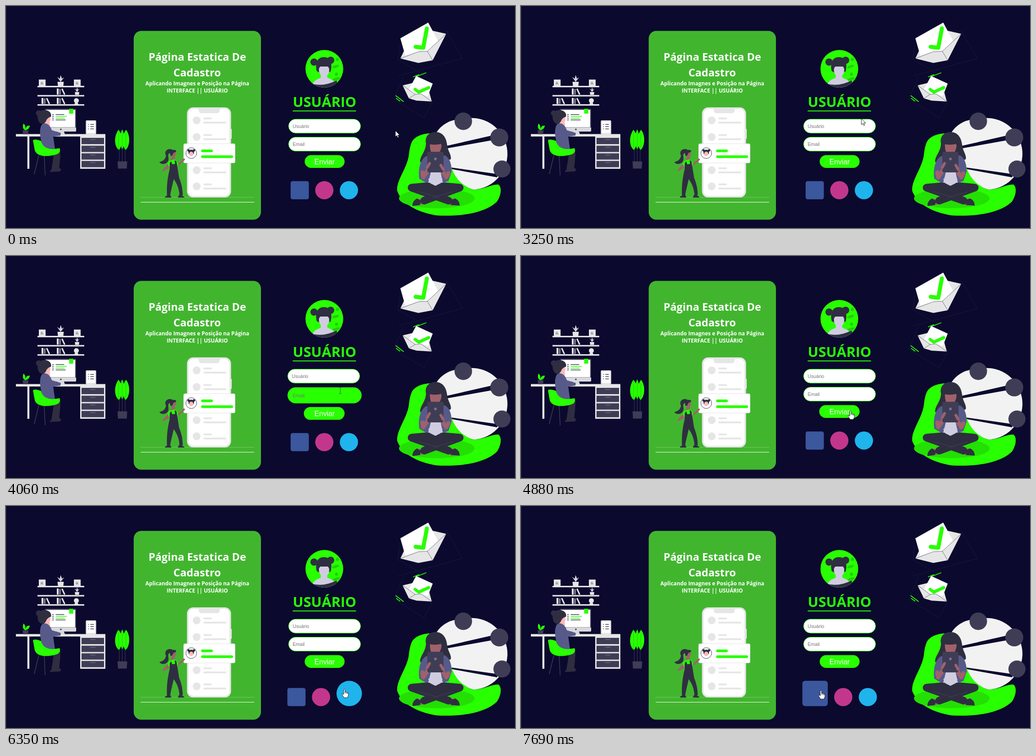
An HTML page for the animation above (8280 ms loop, 1132 by 495 pixels).

```html
<!DOCTYPE html>
<html lang="pt">
<head>
<meta charset="utf-8">
<title>Cadastro</title>
<style>
  html, body { margin: 0; width: 100%; height: 100%; overflow: hidden; background: #0b092e; }
  svg { display: block; width: 100%; height: 100%; }
  .head { font-family: "Open Sans", "Noto Sans", sans-serif; font-weight: 700; text-anchor: middle; fill: #fff; }
  .field { font: 10.67px "Liberation Sans", Arial, sans-serif; fill: #757575; }
  .line { fill: none; stroke-linecap: round; stroke-linejoin: round; }
</style>
</head>
<body>
<svg viewBox="0 0 1132 495">
  <rect width="1132" height="495" fill="#0b092e"/>
  <rect width="1" height="495" fill="#24232f"/>

  <!-- desk -->
  <g id="shelves"></g>
  <g id="desk">
    <path d="M22 285.5h199v5.5H22zM47.500 291h4.500v72h-4.500zM165 291h56v72h-56z" fill="#e6e6e6"/>
    <g id="drawers"></g>
    <rect x="86.500" y="229" width="69.500" height="51" rx="2" fill="#3f3d56"/>
    <path d="M89 231.500h65v39H89z" fill="#fff"/>
    <path d="M87 271h69v7q0 2-2 2H89q-2 0-2-2zM114 280h15l2 6h-19z" fill="#d9d9de"/>
    <circle cx="122" cy="275" r="1.800" fill="#3f3d56"/>
    <path d="M140.500 229h9v11h-9z" fill="#28ff00"/>
    <path class="line" d="M111 242h18M111 254h21" stroke="#3f3d56" stroke-width="1.400"/>
    <path class="line" d="M111 246h24M111 250h19" stroke="#28ff00" stroke-width="1.400"/>
    <path class="line" d="M104 242h1M104 246h1M104 250h1M104 254h1" stroke="#3f3d56" stroke-width="2"/>
    <rect x="177.500" y="255" width="23" height="31" rx="2" fill="#e6e6e6"/>
    <path d="M180 258h18v25h-18z" fill="#fff"/>
    <path class="line" d="M188 264h7M188 269h7M188 274h7M183 264h1M183 269h1M183 274h1" stroke="#3f3d56" stroke-width="1.300"/>
    <path d="M37 277h13l-1 9H38z" fill="#3f3d56"/>
    <path d="M43 277C36 274 37 267 39 262C43 266 44 270 43 277C44 268 48 266 53 267C52 273 48 276 43 277" fill="#28ff00"/>
    <path class="line" d="M73 333L63 374M85 334L87 377" stroke="#3f3d56" stroke-width="1.500"/>
    <path d="M94 320L117 317C122 322 121 330 120 344L118 364L101 365L106 333L92 335Z" fill="#2f2e41"/>
    <path d="M97 370Q100 361 121 362Q124 367 119 369Z" fill="#2f2e41"/>
    <path d="M88 252L97 255L98 268L84 266Z" fill="#ffb9b9"/>
    <ellipse cx="93.500" cy="252" rx="5.500" ry="7.500" fill="#ffb9b9"/>
    <path d="M80 264C89 258 98 265 102 277L122 283L121 289L105 291L109 320L86 322C76 302 72 275 80 264Z" fill="#575a89"/>
    <circle cx="73" cy="239" r="6.500" fill="#2f2e41"/>
    <path d="M72 256C67 243 73 232 85 232C96 232 102 239 100 247Q94 248 90 254C87 264 77 266 72 256Z" fill="#2f2e41"/>
    <path d="M60 300C61 296 71 298 78 301C82 318 99 322 119 317C122 323 119 329 112 331C95 336 70 338 64 322Z" fill="#28ff00"/>
    <path class="line" d="M252 300v47M258.500 300v47M265 300v47" stroke="#3f3d56"/>
    <path d="M248 346.500h21.500l-1 16H249z" fill="#3f3d56"/>
    <path d="M251 321C241 314 239 292 250 276C260 286 260 312 251 321ZM266 321C258 312 257 288 267 276C278 290 275 314 266 321ZM258.500 320C252 306 252 288 258.500 275C265 289 265 307 258.500 320Z" fill="#28ff00"/>
    <path class="line" d="M250.500 280V321M258.500 280V320M266.500 280V321" stroke="#18a806" stroke-width=".6"/>
  </g>

  <!-- card -->
  <rect x="284" y="55.500" width="283" height="421" rx="17" fill="#42b52f"/>
  <g class="head">
    <text x="425.500" y="122" font-size="23.700">Página Estatica De</text>
    <text x="425" y="156.500" font-size="23.700">Cadastro</text>
    <text x="425.500" y="177" font-size="11.850">Aplicando Imagnes e Posição na Página</text>
    <text x="425.500" y="193" font-size="11.850">INTERFACE || USUÁRIO</text>
  </g>
  <path d="M299 426.500h253" stroke="#72ca63"/>
  <path d="M299.500 437.500h252.500" stroke="#fff"/>
  <rect x="499" y="274" width="3" height="22" rx="1" fill="#e6e6e6"/>
  <rect x="402.500" y="226" width="98" height="201" rx="14" fill="#e6e6e6"/>
  <rect x="406" y="229.500" width="91" height="194" rx="11" fill="#fff"/>
  <path d="M427 229h50q-2 2-2 4q0 6-6 6h-34q-6 0-6-6q0-2-2-4z" fill="#e6e6e6"/>
  <g id="rows" fill="#e6e6e6"></g>
  <rect x="395" y="307" width="114.500" height="43" rx="3" fill="#fff" stroke="#d9dcd9" stroke-width=".8"/>
  <circle cx="412" cy="328" r="12" fill="#fff" stroke="#3f3d56"/>
  <g fill="#2f2e41"><circle cx="406" cy="322" r="2.700"/><circle cx="418" cy="322" r="2.700"/><circle cx="412" cy="326.500" r="6.300"/></g>
  <ellipse cx="412" cy="329.500" rx="4.600" ry="5.200" fill="#ffb9b9"/>
  <path d="M407 327q5-5 10 0v-3q-5-4-10 0z" fill="#2f2e41"/>
  <rect x="434" y="320" width="26" height="6" rx="3" fill="#28ff00"/>
  <rect x="434" y="333" width="71" height="6" rx="3" fill="#28ff00"/>
  <path d="M370 320C357 316 351 326 356 334C353 345 347 346 341 348C346 356 365 353 361 336C360 328 364 327 368 329Z" fill="#2f2e41"/>
  <path d="M368 332L375 330L376 344L367 345Z" fill="#9f616a"/>
  <circle cx="372.500" cy="330" r="5.700" fill="#9f616a"/>
  <path d="M366 334C362 324 369 318 378 322Q380 326 373 327L369 334Z" fill="#2f2e41"/>
  <path class="line" d="M363 352L350 366L366 357M379 349L384 353L396 342" stroke="#9f616a" stroke-width="4"/>
  <path d="M359 351L364 345L374 342L380 345L383 352L379 362L365 363Z" fill="#28ff00"/>
  <path d="M364 351L367 346L370 353L376 352L375 344L379 346L382 364L385 383C389 393 393 405 393 422L386 423C385 408 381 397 373 386C370 400 367 410 365 423L358 422C357 403 359 383 364 364Z" fill="#2f2e41"/>
  <path d="M353 427q2-5 12-6l3 6zM382 427l3-6q9 1 12 6z" fill="#2f2e41"/>

  <!-- sign-up form -->
  <clipPath id="round"><circle cx="708" cy="140" r="42"/></clipPath>
  <circle cx="708" cy="140" r="42" fill="#28ff00"/>
  <g clip-path="url(#round)">
    <g fill="#20cf05"><circle cx="737" cy="119" r="3.500"/><circle cx="735" cy="152" r="3.500"/><ellipse cx="733" cy="135" rx="8" ry="3" transform="rotate(-18 733 135)"/><ellipse cx="734" cy="163" rx="9" ry="3" transform="rotate(-18 734 163)"/></g>
    <g fill="#2f2e41"><circle cx="685" cy="125" r="8"/><circle cx="722" cy="121" r="8"/><path d="M691 145C687 130 691 114 707 114C723 114 726 130 722 146L714 149L698 149Z"/></g>
    <path d="M697 135Q706 126 718 135C720 146 718 152 714 155L715 160C726 164 733 167 736 184H678C682 168 688 165 700 160L700 154C696 149 695 144 697 135Z" fill="#d0cde1"/>
    <path d="M680 184L683 174Q708 180 735 166L742 184Z" fill="#2f2e41"/>
    <path d="M693 143Q694 124 708 125Q720 126 721 143L716 135L699 135Z" fill="#2f2e41"/>
  </g>
  <text id="title" class="head" x="708.500" y="225" font-size="31.200">USUÁRIO</text>
  <path d="M637.500 234h141" stroke="#28ff00" stroke-width="1.800"/>
  <g id="inputs"></g>
  <rect id="button" fill="#28ff00" height="28.500" rx="14.250"/>
  <text id="send" x="708.500" text-anchor="middle" fill="#fff" font-size="16" font-family="Liberation Sans, Arial, sans-serif">Enviar</text>
  <g id="icons"></g>

  <!-- mail -->
  <g class="line" stroke="#1b1938">
    <path d="M979 55L1015 117L872 156M875 88L872 120L936 157"/>
    <path d="M884 158L862 208L930 249L950 211"/>
  </g>
  <path d="M877 117L888 94L948 55L979 62L949 121L917 127Z" fill="#e6e6e6"/>
  <path d="M877 72L939 37L961 78L937 101L917 102L888 111Z" fill="#fff"/>
  <path class="line" d="M877 117L917 102L937 101L979 62M937 101L949 121" stroke="#3f3d56" stroke-width=".7"/>
  <path class="line" d="M911 91L928 93L936 50" stroke="#28ff00" stroke-width="9"/>
  <path class="line" d="M906 158L918 153M913 157L934 149" stroke="#28ff00" stroke-width="1.800"/>
  <path d="M882 177L903 172L941 191L947 213L913 211L896 206Z" fill="#e6e6e6"/>
  <path d="M912 156L949 173L938 201L923 196L910 197L896 186Z" fill="#fff"/>
  <path class="line" d="M882 177L910 197L923 196L947 213M910 197L896 206" stroke="#3f3d56" stroke-width=".7"/>
  <path class="line" d="M910 186L918 192L940 182" stroke="#28ff00" stroke-width="7"/>
  <path class="line" d="M867 200L884 213M868 206L876 212" stroke="#28ff00" stroke-width="1.800"/>

  <!-- beanbag -->
  <path d="M950 300C956 274 980 252 1014 252.500A80 80 0 1 1 1040 409.500Q1010 402 985 370Z" fill="#f2f2f2"/>
  <path d="M975 313L1084 288L1094 297L977 318ZM982 359L1095 375L1092 382L982 362Z" fill="#0b092e"/>
  <g fill="#3f3d56"><circle cx="1017" cy="257" r="19.500"/><circle cx="1097" cy="293" r="20"/><circle cx="1103" cy="363.500" r="19"/></g>
  <path d="M901 307C906 292 922 286 940 284C970 284 982 310 986 343C992 372 1005 396 1037 409C1058 411 1080 397 1095 398C1105 406 1099 426 1092 436C1066 462 1010 470 958 467C914 460 880 441 870 412C868 388 892 362 896 332Q897 318 901 307Z" fill="#28ff00"/>
  <ellipse cx="958" cy="429" rx="84" ry="22" fill="#24df03"/>
  <path d="M934 306C931 291 941 281 955 281C972 281 979 294 981 309C982 323 992 333 989 342L963 350L921 348C920 334 934 325 934 306Z" fill="#2f2e41"/>
  <path d="M934 335L976 333C990 341 991 359 991 370L984 390L974 394H934L919 385C916 360 922 343 934 335Z" fill="#575a89"/>
  <path d="M943 327L965 326L967 372L973 402H937L945 370Z" fill="#d0cde1"/>
  <path d="M943 306H969C969 317 966 324 963 327V334H945V325Q942 316 943 306Z" fill="#a0616a"/>
  <path d="M940 318Q941 300 955 294Q967 300 971 319C981 297 970 285 955 285C941 285 936 299 940 318ZM942 308Q956 311 969 307L967 298H944Z" fill="#2f2e41"/>
  <path class="line" d="M926 371L928 382L943 359M984 373L979 382L968 364" stroke="#a0616a" stroke-width="9"/>
  <rect x="937" y="325" width="36" height="46" rx="4" fill="#3f3d56"/>
  <circle cx="955" cy="341" r="3" fill="#75738e"/>
  <path class="line" d="M937 360L942 351M972 364L967 355" stroke="#a0616a" stroke-width="6"/>
  <path d="M905 443L914 430L932 431L924 444ZM981 431L998 429L1007 441L989 445Z" fill="#a0616a"/>
  <path class="line" d="M976 402L1009 405L930 434M935 402L902 405L984 434" stroke="#2f2e41" stroke-width="17"/>
  <path d="M934 394H976L970 420H940Z" fill="#2f2e41"/>
  <path d="M904 446Q903 435 914 429L924 435L920 444ZM988 433L999 429Q1009 434 1009 445L990 444Z" fill="#2f2e41"/>
  <path d="M939 385H971L967 395L955 401L943 395Z" fill="#d0cde1"/>
  <path class="line" d="M918 414L961 426M994 414L950 427" stroke="#45445c" stroke-width=".8"/>

  <circle id="click" r="10.500" fill="#ff0" fill-opacity=".47"/>
  <g id="cursor" fill="#fff" stroke="#111" stroke-width=".9" stroke-linejoin="round">
    <path d="M0 0V13.500L3.200 10.700L5.300 15.500L7.500 14.600L5.400 9.900H9.600Z"/>
    <path d="M-2.500 -6.500H-.8Q0 -6.500 0 -5.500V5.500Q0 6.500 -.8 6.500H-2.500M2.500 -6.500H.8Q0 -6.500 0 -5.500M0 5.500Q0 6.500 .8 6.500H2.500" fill="none" stroke="#47564a"/>
    <path d="M-1.500 1.500Q0 -1 1.500 1.500V7Q3 5.500 4.500 7.500Q6 6 7 8Q9 7 9 10V14Q8 17 6.500 19.500H-.5Q-3 16 -5 12.500Q-5.500 10 -3.500 10.500L-1.500 12.500ZM1.500 7V10M4.500 7.500V10.500M7 8V11"/>
  </g>
</svg>
<script>
const LOOP = 8280, LIME = '#28ff00';
const $ = id => document.getElementById(id);
const clamp = v => Math.max(0, Math.min(1, v));
const within = (t, a, b) => t >= a && t < b;
const set = (el, attrs) => { for (const k in attrs) el.setAttribute(k, attrs[k]); };
const rect = (x, y, w, h, fill, rx = 0) =>
  `<rect x="${x}" y="${y}" width="${w}" height="${h}" rx="${rx}" ${fill ? `fill="${fill}"` : ''}/>`;

function buildStatic() {
  $('shelves').innerHTML = [178, 198.5, 219].map(y => rect(70, y, 104, 3.2, '#e6e6e6')).join('') +
    [73, 151].map(x => rect(x, 164, 15, 14, '#e6e6e6') +
      `<path d="M${x + 4} 175v-4l3-3 4 7z" fill="#a9a8b8"/>`).join('') +
    [[113, 184], [79, 205], [113, 205]].map(([x, y]) =>
      rect(x, y, 4, 13.5, '#e6e6e6') + rect(x + 5, y + 1, 4, 12.5, '#77758d') +
      `<path d="M${x + 10} ${y + 1}l3-1 6 13-3 1z" fill="#e6e6e6"/>`).join('') +
    [[121.5, 178, 1], [158, 198, .7]].map(([x, y, s]) =>
      `<g transform="translate(${x} ${y}) scale(${s})"><path d="M-7 -9H7L6 0H-6Z" fill="#e6e6e6"/>` +
      `<path d="M0 -9L-8 -20L-2 -16L0 -24L3 -16L8 -19Z" fill="#d6d5df"/></g>`).join('') +
    '<circle cx="156.500" cy="211" r="5.500" fill="#e6e6e6"/><path d="M152 219l2-4h5l2 4z" fill="#e6e6e6"/>';
  $('drawers').innerHTML = [294, 311.5, 328.5, 345.5].map(y =>
    rect(168, y, 50, 14, '#3f3d56') + rect(187, y + 3, 12, 1.5, '#69677f')).join('');
  $('rows').innerHTML = [255, 292, 366, 402].map(y =>
    `<circle cx="424" cy="${y}" r="8.700"/>` +
    rect(439, y - 6.3, 19, 4, '', 2) + rect(439, y + 3, 51, 4, '', 2)).join('');
  $('inputs').innerHTML = ['Usuário', 'Email'].map(s =>
    `<rect stroke="${LIME}"/><text class="field">${s}</text>`).join('');
  $('icons').innerHTML = ['#3b579d', '#c2378c', '#1fb4ec'].map(c => rect(0, 0, 0, 0, c)).join('');
}

// time, x, y of the pointer tip
const path = [
  [0, 866, 278], [1710, 866, 278], [2030, 810, 217], [2130, 810, 217], [2300, 779, 216],
  [2830, 779, 216], [3250, 757, 251], [3320, 757, 251], [3600, 752, 268], [3710, 752, 268],
  [3840, 746, 295], [4060, 743.5, 300.5], [4150, 743.5, 300.5], [4390, 742, 308], [4530, 742, 308],
  [4740, 738, 334], [5000, 728, 354], [5260, 720, 393], [5340, 719, 398], [5420, 719, 398],
  [5530, 720.5, 395], [6000, 720.5, 395], [6080, 752.5, 408], [6550, 752.5, 408],
  [6950, 717, 404.5], [7140, 717, 404.5], [7690, 667, 411]
];
const clicks = [[1170, 1250], [2440, 2500], [6220, 6350]];

function pointer(t) {
  const i = path.findIndex(p => p[0] > t);
  if (i < 0) return path[path.length - 1].slice(1);
  const [a, x, y] = path[i - 1], [b, u, v] = path[i];
  const k = (t - a) / (b - a);
  return [x + (u - x) * k, y + (v - y) * k];
}

function hoveredIcon(t) {
  if (t < 5260) return -1;
  if (t < 6000) return 1;
  if (t < 6700) return 2;
  return t < 7400 ? 1 : 0;
}

function drawForm(t) {
  const hover = [within(t, 3330, 3840), within(t, 3840, 4740)];
  const grow = [hover[0] ? clamp((t - 3330) / 270) : 0, hover[1] ? clamp((t - 3840) / 460) : 0];
  const sum = grow[0] + grow[1], left = 628.5 - 4 * sum;
  const [r0, t0, r1, t1] = $('inputs').children;
  [[r0, t0, 252.3, 0], [r1, t1, 292.5 + 8 * grow[0] + 1.5 * grow[1], 1]].forEach(([box, label, y, i]) => {
    const g = grow[i], h = 31 + 8 * g;
    set(box, { x: left, y, width: 160 + 8 * g, height: h, rx: h / 2, fill: hover[i] ? LIME : '#fff' });
    set(label, { x: left + 9 + 4 * g, y: y + 19.7 + 4 * g });
  });
  const pressed = within(t, 4850, 5620) ? 1 : 0;
  const extra = Math.max(pressed, Math.min(2, 4 * sum)), drop = 9 * sum;
  set($('button'), { x: 664.3 - extra, y: 332.5 + drop, width: 88.7 + extra });
  set($('send'), { y: 352.7 + drop });
  drawIcons(hoveredIcon(t), drop + pressed * .7);
}

function drawIcons(active, drop) {
  let x = active < 0 ? 633 : 625.7;
  const bottom = (active < 0 ? 431 : 446.3) + drop;
  [...$('icons').children].forEach((el, i) => {
    const s = i === active ? 56.5 : 40.5;
    set(el, { x, y: bottom - s, width: s, height: s, rx: i ? s / 2 : s * .11 });
    x += s + 14.2;
  });
}

function draw(t) {
  const [x, y] = pointer(t);
  const kind = within(t, 3330, 4740) ? 1 : t < 4850 ? 0 : 2;
  set($('title'), { style: `fill:${within(t, 2230, 2900) ? '#fff' : LIME}` });
  drawForm(t);
  set($('cursor'), { transform: `translate(${x} ${y})` });
  [...$('cursor').children].forEach((el, i) => set(el, { display: i === kind ? 'inline' : 'none' }));
  const down = clicks.some(([a, b]) => within(t, a, b));
  set($('click'), { cx: x, cy: y, display: down ? 'inline' : 'none' });
}

buildStatic();
const start = performance.now();
function tick() {
  draw((performance.now() - start) % LOOP);
  requestAnimationFrame(tick);
}
tick();
</script>
</body>
</html>
```
